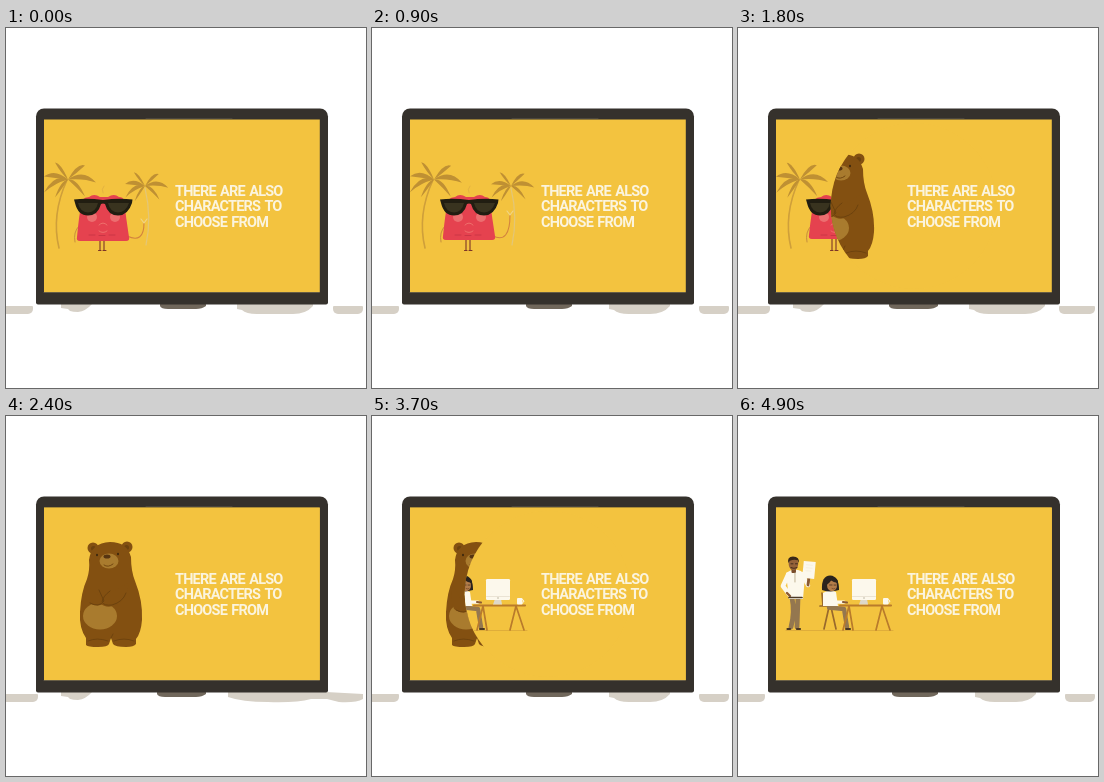
Animation of 360 by 360 pixels, one loop 5 s. Source, as an HTML page with a canvas:

```html
<!DOCTYPE html>
<html lang="en">
<head>
<meta charset="utf-8">
<title>Characters</title>
<style>
html, body { margin: 0; width: 100%; height: 100%; overflow: hidden; background: #fff; }
canvas { display: block; width: 360px; height: 360px; }
</style>
</head>
<body>
<canvas id="stage"></canvas>
<script>
const LOOP = 5000;
const YELLOW = '#f3c33f', DARK = '#35312c', BEIGE = '#d6d0c6', WHITE = '#fcf8ec';
const SCREEN = { x: 38, y: 91.5, w: 275.8, h: 172.7 };
const stage = document.getElementById('stage');
const dpr = window.devicePixelRatio || 1;
stage.width = stage.height = 360 * dpr;
const c = stage.getContext('2d');

function fill(path, color) {
  c.fillStyle = color;
  c.fill(new Path2D(path));
}
function line(path, color, width) {
  c.strokeStyle = color;
  c.lineWidth = width;
  c.lineCap = c.lineJoin = 'round';
  c.stroke(new Path2D(path));
}
function oval(x, y, rx, ry, color) {
  c.fillStyle = color;
  c.beginPath();
  c.ellipse(x, y, rx, ry, 0, 0, Math.PI * 2);
  c.fill();
}
function box(x, y, w, h, r, color) {
  c.fillStyle = color;
  c.beginPath();
  c.roundRect(x, y, w, h, r);
  c.fill();
}
function at(x, y, turn, draw) {
  c.save();
  c.translate(x, y);
  c.rotate(turn);
  draw();
  c.restore();
}
const clamp = u => Math.min(1, Math.max(0, u));
const ease = u => u < .5 ? 2 * u * u : 1 - 2 * (1 - u) * (1 - u);
const progress = (t, from, to) => ease(clamp((t - from) / (to - from)));
const swing = (t, period, shift = 0) => Math.sin((t / period + shift) * Math.PI * 2);

// A leaf is a crescent from the crown to (x, y), bowed upwards.
function leaf(x, y, bow) {
  const mx = x * .55, my = y * .5 - bow;
  fill(`M0 0Q${mx} ${my - 5} ${x} ${y}Q${mx} ${my + 5} 0 0Z`, '#bf9033');
}
function palm(x, y, size, turn) {
  at(x, y, turn, () => {
    c.scale(size, size);
    leaf(-24, 13, 8);
    leaf(-24, -3, 5);
    leaf(-13, -17, 3);
    leaf(17, -14, 5);
    leaf(28, 3, 8);
    leaf(17, 17, 5);
    leaf(-13, 18, 3);
  });
}

function beach(t) {
  line('M61 152Q45 187 53 220', '#cf9f3a', 1.6);
  line('M139 160Q146 190 140 217', '#e3c677', 1.2);
  palm(62, 151.5, 1, swing(t, 2400) * .015);
  palm(139, 158, .83, -.03 - swing(t, 2400) * .015);

  const bob = swing(t, 1200, .25);
  const handY = 187 + bob * 8;
  line('M94 211L94 222M98 211L98 222', '#7d3527', 1.1);
  line('M92.5 222.5H95M97 222.5H100', '#7d3527', 1);
  line('M73 198Q67 204 69 214', '#c78f3c', 1);
  line(`M121 208Q138 216 138 ${handY}`, '#d3833e', 1.1);
  line(`M138 ${handY}L135 ${handY - 4}M138 ${handY}L141 ${handY - 4}`, '#f0d58a', 1.1);

  const low = 212 + bob;
  fill(`M76 172Q79 169 83 169Q88 165 94 169H102Q108 165 113 169Q117 169 118 172` +
       `Q120 190 123 ${low - 4}Q124 ${low} 120 ${low}H74Q70 ${low} 71 ${low - 4}Q73 187 76 172Z`, '#e5424f');
  oval(86, 189, 5, 5, '#ec6e70');
  oval(109, 189, 5, 5, '#ec6e70');
  line('M93 197Q97 193 101 197M93 203Q97 206 101 203', '#f07a73', .8);
  line('M83 207H89M93 207.5H99M103 207H109', '#c83445', .9);

  fill('M68 171.5Q82 170 97 172Q112 170 126.5 171.5L126 175Q122 187.5 112 187.5Q102 187.5 99 176Q97 175 95 176' +
       'Q92 187.5 82 187.5Q72 187.5 69 175Z', '#211d11');
  fill('M72 175H92Q90 184 82 184.5Q74 184 72 175Z', '#39331f');
  fill('M102 175H123Q120 184 112 184.5Q104 184 102 175Z', '#39331f');
  line('M97 165Q95 161 98 158', '#dfae42', .8);
}

function bear(t) {
  const skin = '#835011', shade = '#6c420e', light = '#a97b2e';
  const drop = progress(t, 2500, 3100) * 7;
  oval(87, 132, 5.5, 5.5, skin);
  oval(121, 131, 5.5, 5.5, skin);
  oval(87.5, 132.5, 2.5, 2.5, shade);
  oval(120.5, 131.5, 2.5, 2.5, shade);
  fill('M104 126Q121 126 125 141Q125 155 129 165Q137 185 136 204Q135 217 130 223L130 228Q128 231 120 231' +
       'Q109 231 107 228L105 222L103 228Q102 231 92 231Q82 231 80 229L80 222Q73 212 74 196' +
       'Q75 176 81 163Q84 154 83 144Q85 127 104 126Z', skin);
  oval(94, 200, 17, 13.5, light);
  oval(103, 145, 9.5, 7.5, light);
  oval(101, 140.5, 3.5, 2.1, '#573511');
  line('M98 149Q102 152 107 148', shade, .9);
  oval(91, 139, 1, 1.2, '#3d270d');
  oval(112, 138, 1, 1.2, '#3d270d');

  const paw = 184 + drop;
  fill(`M81 169Q77 181 82 ${paw + 2}Q92 ${paw + 9} 99 ${paw + 2}Q98 ${paw - 5} 90 ${paw - 6}Z`, skin);
  fill(`M122 167Q123 182 112 ${paw + 4}Q101 ${paw + 10} 94 ${paw + 3}Q94 ${paw - 4} 104 ${paw - 7}Z`, skin);
  line(`M84 ${paw + 3}Q93 ${paw + 8} 98 ${paw + 1}L93 ${paw - 10}`, shade, 1);
  line(`M120 177Q117 ${paw + 2} 106 ${paw + 5}Q98 ${paw + 6} 96 ${paw + 2}Q97 ${paw - 4} 104 ${paw - 9}`, shade, 1);
  line('M105 222L107 218M82 225Q91 221 102 225M108 225Q118 221 128 225', shade, .9);
}

function man(t) {
  const sway = swing(t, 1600, .45);
  line('M54 182Q57 196 53 211M60 182L59 211', '#94774f', 4.8);
  line('M52 213H49.5M59 213H62', '#493722', 2.2);
  at(57, 183, sway * .015, () => {
    c.translate(-57, -183);
    fill('M48 157Q55 152 63 155L67 160L65 183H51Z', WHITE);
    line('M50 159L45 170L51 178', WHITE, 4.6);
    line('M49 177L52 180', '#8a5a34', 2.4);
    line('M51 181.5H64', '#4c3a28', 1.7);
    line('M64 158L70 169', WHITE, 4.4);
    line('M70 169L71 161', '#8a5a34', 2.8);
    at(71, 154, .1 + sway * .04, () => {
      box(-6, -8.5, 12, 17, 0, WHITE);
      line('M-3 -5H3M-3 -2H3M-3 1H2', '#f0e7d1', .5);
    });
    box(53.5, 151, 4.5, 6, 1, '#794c2b');
    oval(55.5, 148, 4.8, 6.2, '#946139');
    fill('M50.3 147Q49 141 55 140.6Q62 141 60.8 147L59.5 144.2Q56 143 52 144.8Z', '#3a2818');
    line('M53 151.5Q56 153 59 151.5', '#4a3019', 1);
    line('M53 147.8H55M57.5 147.8H59.5', '#38281a', .9);
    line('M57 157L57 166', '#b8aa8b', .9);
  });
}

function woman(t) {
  const nod = swing(t, 1200) * .025;
  const tap = swing(t, 400) * .6;
  line('M82 190H98M91 191L86 213M93 191L98 213M84 177L85 190', '#99692c', 1.7);
  line('M91 191.5L106 193L109 211', '#94774f', 4.4);
  line('M108 213H112', '#493722', 2);
  fill('M85 177Q91 173 98 176L100 190H85Z', WHITE);
  line(`M94 179L98 186L106 ${185.5 + tap}`, WHITE, 3.4);
  line(`M105 ${185.5 + tap}L109 ${186 + tap}`, '#8a5a34', 2);
  at(92, 175, nod, () => {
    c.translate(-92, -175);
    fill('M84 174Q83 160 92 159.5Q101 160 101 174Q92 177 84 174Z', '#2a231d');
    oval(94, 169.5, 5, 5.6, '#b37c49');
    fill('M88 169Q88 161 95 161.5Q100 162 100 167Q95 166 93 164.5Q91 168 88 169Z', '#2a231d');
    line('M91.5 169H94M96 169H98', '#4a3420', .8);
    line('M94 172.5Q96 173.5 97 172.5', '#6e4527', .7);
  });
}

function office(t) {
  line('M48 214.5H155', '#dfad3a', 1.2);
  man(t);
  woman(t);
  line('M111 190L105 214M111 190L115 214M144 190L138 214M144 190L152 214', '#b97b2b', 1.7);
  line('M102 189.5H153', '#b97b2b', 2.1);
  fill('M123 183H129L130 188.5H121Z', '#ded8c8');
  box(114, 163, 24, 21, 1.2, WHITE);
  line('M114.5 180.5H137.5', '#e6dfce', .8);
  oval(126, 182, .7, .7, '#aaa08d');
  box(145, 182, 5.5, 6.5, 1, WHITE);
  line('M150.5 183.5Q153.5 185 150.5 187', WHITE, 1);
}

// Opens the next scene in a circle that grows from the middle of the screen.
function iris(draw, t, from) {
  const p = progress(t, from, from + 500);
  if (!p) return;
  c.save();
  c.beginPath();
  c.arc(SCREEN.x + SCREEN.w / 2, SCREEN.y + SCREEN.h / 2, p * 165, 0, Math.PI * 2);
  c.clip();
  c.fillStyle = YELLOW;
  c.fillRect(SCREEN.x, SCREEN.y, SCREEN.w, SCREEN.h);
  draw(t);
  c.restore();
}

function title() {
  c.fillStyle = '#fbf4de';
  c.font = '700 14.5px Roboto, sans-serif';
  c.letterSpacing = '-0.8px';
  c.wordSpacing = '1.5px';
  ['THERE ARE ALSO', 'CHARACTERS TO', 'CHOOSE FROM'].forEach((s, i) => c.fillText(s, 169, 167.7 + i * 15.4));
}

function slab(left, right) {
  box(left, 278, right - left, 8, [1, 1, 5, 5], BEIGE);
}
function base(t) {
  const wide = t >= 2100 && t < 3700;
  const mid = t < 500 || t >= 1300 && t < 3700;
  const late = mid && t >= 1300;
  slab(-6, late ? 32 : 27);
  if (mid) fill('M55 276H86Q80 283 72 284Q67 284 64 283L62 281L55 280Z', BEIGE);
  if (wide) {
    fill('M222 276H320L357 278V283Q350 287 333 286L321 283H305Q290 287 262 286Q236 286 222 281Z', BEIGE);
  } else {
    const [a, b] = mid ? [231, 307] : [237, 298];
    fill(`M${a} 276H${b}V278Q${b - 7} 286 ${b - 20} 286H${a + 20}Q${a + 9} 286 ${a + 5} 282L${a} 281Z`, BEIGE);
    slab(late ? 321 : 327, 357);
  }
  const left = late ? 151 : 154;
  fill(`M${left} 275H200V278Q196 281 190 281H${left + 8}Q${left + 1} 281 ${left} 278Z`, '#70675b');
}

function render(t) {
  c.setTransform(dpr, 0, 0, dpr, 0, 0);
  c.fillStyle = '#fff';
  c.fillRect(0, 0, 360, 360);
  base(t);
  box(30, 80.5, 292, 196, [8, 8, 2, 2], DARK);
  c.save();
  c.beginPath();
  c.rect(SCREEN.x, SCREEN.y, SCREEN.w, SCREEN.h);
  c.fillStyle = YELLOW;
  c.fill();
  c.clip();
  beach(t);
  iris(bear, t, 1550);
  iris(office, t, 3450);
  title();
  c.restore();
  line('M38 264.5H313', '#67604f', .7);
  line('M140 90.5H226', '#5b5548', .6);
}

const start = performance.now();
function tick() {
  render((performance.now() - start) % LOOP);
  requestAnimationFrame(tick);
}
tick();
</script>
</body>
</html>
```
